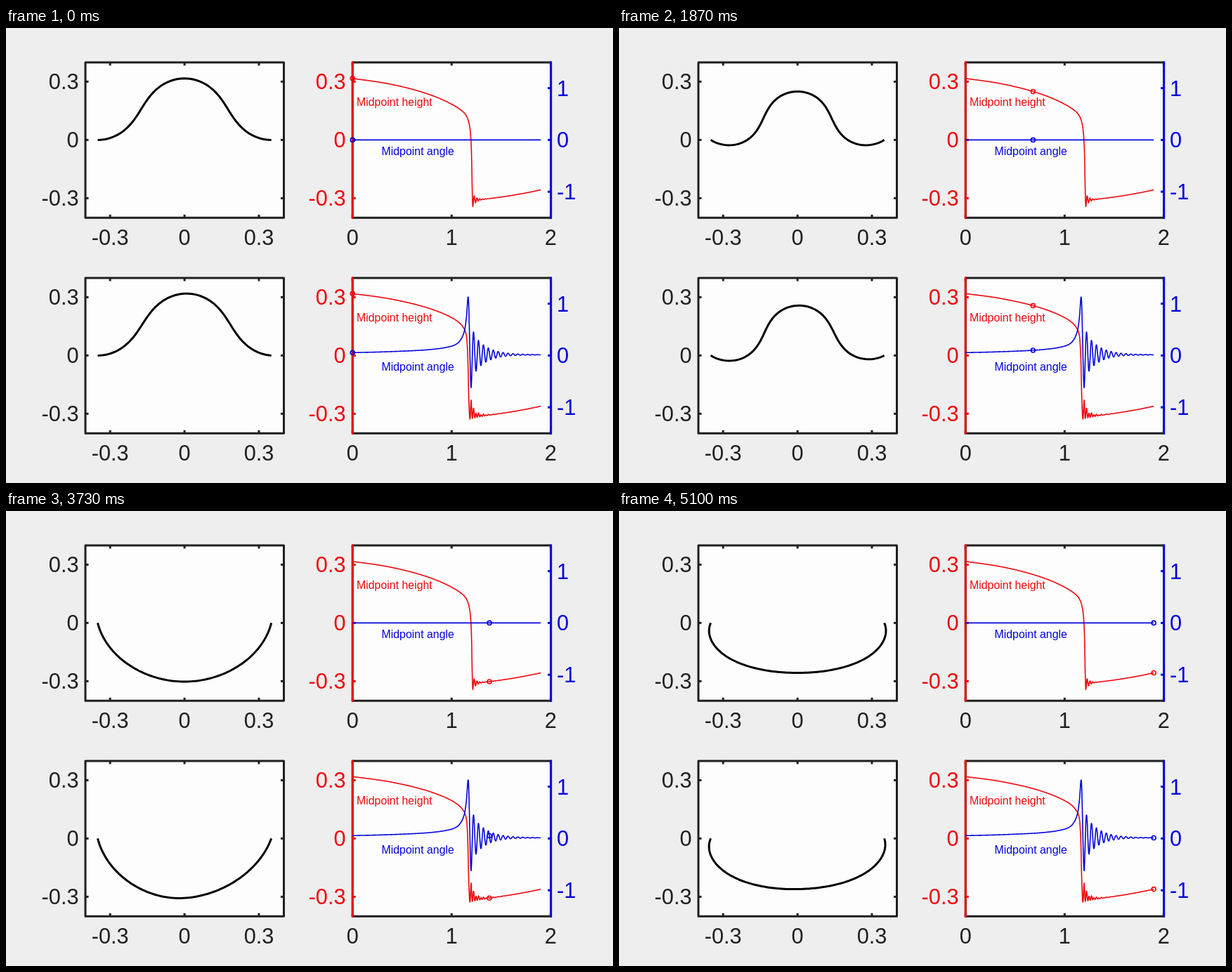
These frames come from a looping animation (864x648 px, 5130 ms). An HTML page with a canvas:

```html
<!DOCTYPE html>
<html lang="en">
<head>
<meta charset="utf-8">
<title>Snap-through of a rotated arch</title>
<style>
html, body { margin: 0; width: 100%; height: 100%; overflow: hidden; background: #eee; }
canvas { display: block; }
</style>
</head>
<body>
<canvas id="stage" width="864" height="648"></canvas>
<script>
const ctx = document.getElementById('stage').getContext('2d');
const RED = '#ec080e', BLUE = '#0404dc', DARK = '#1e201f';
const LOOP = 5130, LAST = 153, END = 1.9;
const FONT = '"Liberation Sans", Arial, sans-serif';

// Monotone cubic interpolation through [x, y] knots
function spline(p) {
  const n = p.length - 1;
  const sec = i => (p[i + 1][1] - p[i][1]) / (p[i + 1][0] - p[i][0]);
  const slope = p.map((_, i) => {
    if (i === 0) return sec(0);
    if (i === n) return 0;
    const a = sec(i - 1), b = sec(i);
    return a * b > 0 ? 2 * a * b / (a + b) : 0;
  });
  return x => {
    let i = 0;
    while (i < n - 1 && x > p[i + 1][0]) i++;
    const w = p[i + 1][0] - p[i][0], u = (x - p[i][0]) / w, v = 1 - u;
    return p[i][1] * v * v * (1 + 2 * u) + p[i + 1][1] * u * u * (3 - 2 * u)
      + w * u * v * (slope[i] * v - slope[i + 1] * u);
  };
}

// Midpoint height and angle as functions of the end rotation t
const sag = t => -0.302 + 0.075 * (t - 1.38) + 0.052 * (t - 1.38) * (t - 1.68);
const ring = (u, period) => Math.cos(2 * Math.PI * u / period);

const fallA = spline([[0, .3165], [.28, .2966], [.5, .274], [.68, .2495], [.85, .2196], [1, .184],
  [1.08, .159], [1.13, .1375], [1.16, .112], [1.18, .075], [1.19, .035], [1.197, -.02],
  [1.203, -.12], [1.207, -.24], [1.214, -.342]]);
const heightA = t => t < 1.214 ? fallA(t)
  : sag(t) - 0.032 * Math.exp((1.214 - t) / 0.035) * ring(t - 1.214, 0.028);

const rise = spline([[0, .055], [.28, .068], [.68, .1], [.86, .13], [1, .18], [1.06, .235],
  [1.1, .33], [1.131, .49], [1.15, .75], [1.167, 1.13], [1.197, -.62]]);
const angleB = t => {
  const u = t - 1.197;
  return u < 0 ? rise(t) : 0.012 + 0.018 * Math.exp(-u / 0.3)
    - (0.47 * Math.exp(-u / 0.13) + 0.18 * Math.exp(-u / 0.015)) * ring(u, 0.0497);
};
const fallB = spline([[0, .3185], [.28, .3], [.5, .279], [.68, .2568], [.85, .229], [1, .195],
  [1.08, .167], [1.13, .134], [1.15, .1], [1.16, .03], [1.166, -.06], [1.172, -.2], [1.184, -.326]]);
const heightB = t => t < 1.184 ? fallB(t)
  : sag(t) - 0.004 - 0.012 * Math.exp((1.184 - t) / 0.1) + 0.25 * angleB(t) ** 2;

// The lower strip's right end lags behind by a small tilt
const models = [
  { top: 49, tilt: 0, height: heightA, angle: () => 0 },
  { top: 356, tilt: 0.09, height: heightB, angle: angleB }
];

// Strip of unit length: tangent angle = linear part + sine modes
const SEG = 100, MODES = 10, SPAN = 0.7;
const mode = Array.from({ length: MODES }, (_, k) =>
  Array.from({ length: SEG }, (_, i) => Math.sin((k + 1) * Math.PI * (i + 0.5) / SEG)));
const tangent = (a, t, tilt, i) =>
  a.reduce((sum, c, k) => sum + c * mode[k][i], (2 * t - tilt) * (i + 0.5) / SEG - t);

function solve(m, r) {
  const n = r.length;
  for (let c = 0; c < n; c++) {
    let p = c;
    for (let i = c; i < n; i++) if (Math.abs(m[i][c]) > Math.abs(m[p][c])) p = i;
    [m[c], m[p]] = [m[p], m[c]];
    [r[c], r[p]] = [r[p], r[c]];
    for (let i = 0; i < n; i++) {
      if (i === c) continue;
      const f = m[i][c] / m[c][c];
      for (let j = c; j < n; j++) m[i][j] -= f * m[c][j];
      r[i] -= f * r[c];
    }
  }
  return r.map((v, i) => v / m[i][i]);
}

// One step towards least bending energy with span, ends and midpoint fixed
function relax(a, t, { tilt, height, angle }) {
  const miss = [-SPAN, 0, -height(t), -tilt / 2 - angle(t)];
  const jac = miss.map(() => Array(MODES).fill(0));
  for (let i = 0; i < SEG; i++) {
    const th = tangent(a, t, tilt, i), c = Math.cos(th) / SEG, s = Math.sin(th) / SEG;
    const half = i < SEG / 2 ? 1 : 0;
    miss[0] += c;
    miss[1] += s;
    miss[2] += s * half;
    for (let k = 0; k < MODES; k++) {
      const g = mode[k][i];
      jac[0][k] -= s * g;
      jac[1][k] += c * g;
      jac[2][k] += c * g * half;
    }
  }
  for (let k = 0; k < MODES; k++) {
    jac[3][k] = Math.sin((k + 1) * Math.PI / 2);
    miss[3] += jac[3][k] * a[k];
  }
  const gram = jac.map(p => jac.map(q => p.reduce((s, v, k) => s + v * q[k] / (k + 1) ** 2, 0)));
  const force = solve(gram, jac.map((row, j) => row.reduce((s, v, k) => s + v * a[k], -miss[j])));
  const step = a.map((v, k) => jac.reduce((s, row, j) => s + row[k] * force[j], 0) / (k + 1) ** 2 - v);
  const scale = Math.min(1, 0.3 / Math.hypot(...step));
  return a.map((v, k) => v + scale * step[k]);
}

const rotation = n => n >= LAST ? END : Math.max(0, (n - 1.5) * 0.0125);

function shapes(model) {
  let a = Array(MODES).fill(0);
  a[1] = 1.14;
  for (let i = 0; i < 40; i++) a = relax(a, 0, model);
  const list = [];
  for (let n = 0; n <= LAST; n++) {
    const from = rotation(Math.max(0, n - 1)), to = rotation(n);
    for (let j = 1; j <= 6; j++) {
      for (let i = 0; i < 8; i++) a = relax(a, from + (to - from) * j / 6, model);
    }
    list.push(a);
  }
  return list;
}

// Plot geometry
const H = 221.3, MID = 110.4;
const sx = x => 254.1 + 353 * x;
const px = t => 493.3 + 141 * t;
const yh = h => MID - 276.6 * h;
const ya = a => MID - 73.77 * a;

function line(color, width, ...pts) {
  ctx.strokeStyle = color;
  ctx.lineWidth = width;
  ctx.beginPath();
  pts.forEach(([x, y]) => ctx.lineTo(x, y));
  ctx.stroke();
}
function text(str, x, y, color, align, size = 30.7) {
  ctx.font = size + 'px ' + FONT;
  ctx.fillStyle = color;
  ctx.textAlign = align;
  ctx.fillText(str, x, y);
}
function frame(x, w) {
  ctx.fillStyle = '#fdfdfd';
  ctx.fillRect(x, 0, w, H);
  ctx.strokeStyle = DARK;
  ctx.lineWidth = 3;
  ctx.strokeRect(x, 0, w, H);
}
function tickX(x, label) {
  line(DARK, 3, [x, 0], [x, 4.5]);
  line(DARK, 3, [x, H], [x, H - 4.5]);
  text(label, x, H + 39, DARK, 'center');
}
const tickY = (x, y, dir, color) => line(color, 3, [x, y], [x + 4.5 * dir, y]);

function curve(f, scale, color) {
  const pts = [];
  for (let i = 0; i <= 1900; i++) pts.push([px(i / 1000), scale(f(i / 1000))]);
  line(color, 1.6, ...pts);
}
function marker(x, y, color) {
  ctx.strokeStyle = color;
  ctx.lineWidth = 1.6;
  ctx.beginPath();
  ctx.arc(x, y, 3, 0, 2 * Math.PI);
  ctx.stroke();
}

function drawPlots({ height, angle }) {
  frame(113, 282.5);
  for (const v of [-0.3, 0, 0.3]) {
    tickX(sx(v), v);
    tickY(113, yh(v), 1, DARK);
    tickY(395.5, yh(v), -1, DARK);
    text(v, 103.5, yh(v) + 11, DARK, 'right');
  }
  frame(493.3, 282.3);
  [0, 1, 2].forEach(v => tickX(px(v), v));
  line(RED, 3, [493.3, -1.5], [493.3, H + 1.5]);
  line(BLUE, 3, [775.6, -1.5], [775.6, H + 1.5]);
  for (const v of [-0.3, 0, 0.3]) {
    tickY(493.3, yh(v), 1, RED);
    text(v, 483.5, yh(v) + 11, RED, 'right');
  }
  for (const v of [-1, 0, 1]) {
    tickY(775.6, ya(v), -1, BLUE);
    text(v, 784, ya(v) + 11, BLUE, 'left');
  }
  curve(height, yh, RED);
  curve(angle, ya, BLUE);
  text('Midpoint height', 499, 61.5, RED, 'left', 15.9);
  text('Midpoint angle', 534.5, 131.8, BLUE, 'left', 15.9);
}

function drawStrip(a, t, tilt) {
  let x = -SPAN / 2, y = 0;
  const pts = [[sx(x), yh(y)]];
  for (let i = 0; i < SEG; i++) {
    const th = tangent(a, t, tilt, i);
    x += Math.cos(th) / SEG;
    y += Math.sin(th) / SEG;
    pts.push([sx(x), yh(y)]);
  }
  line('#000', 3, ...pts);
}

ctx.lineJoin = 'round';
models.forEach(m => { m.shapes = shapes(m); });

function draw(now) {
  const ms = Math.floor(now % LOOP / 10) * 10;
  const n = Math.min(LAST, Math.floor((ms + 3.4) * 3 / 100));
  const t = rotation(n);
  ctx.fillStyle = '#eee';
  ctx.fillRect(0, 0, 864, 648);
  for (const m of models) {
    ctx.save();
    ctx.translate(0, m.top);
    drawPlots(m);
    drawStrip(m.shapes[n], t, m.tilt);
    marker(px(t), yh(m.height(t)), RED);
    marker(px(t), ya(m.angle(t)), BLUE);
    ctx.restore();
  }
}

const start = performance.now();
function loop() {
  draw(performance.now() - start);
  requestAnimationFrame(loop);
}
loop();
</script>
</body>
</html>
```
